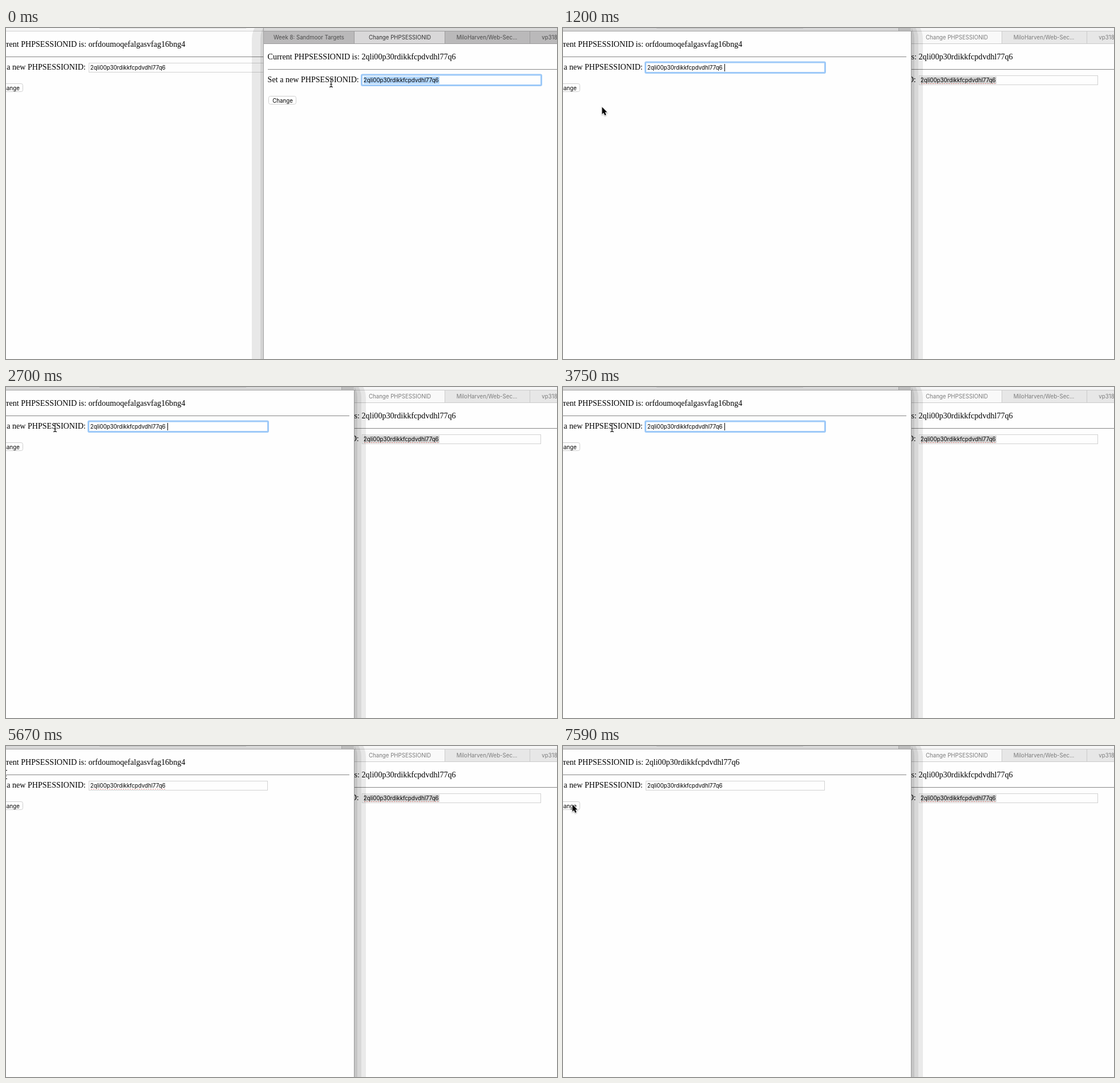
These frames come from a looping animation (966x580 px, 8 s). An HTML page with a canvas:

```html
<!DOCTYPE html>
<html lang="en">
<head>
<meta charset="utf-8">
<title>Session change</title>
<style>
  html, body { margin: 0; width: 100%; height: 100%; overflow: hidden; background: #fefefe; }
  canvas { display: block; }
</style>
</head>
<body>
<canvas id="stage" width="966" height="580"></canvas>
<script>
const W = 966, H = 580, LOOP = 8000;
const SERIF = '14.1px "Liberation Serif", "Times New Roman", serif';
const SANS = '9.7px Inter, Roboto, sans-serif';
const ID_A = 'orfdoumoqefalgasvfag16bng4';
const ID_B = '2qli00p30rdikkfcpdvdhl77q6';
const PAPER = '#fefefe';

const SWITCH = 1200, BLUR = 4340, PRESS = 7440, RELOAD = 7590;

// Pointer moves: start, end, number of held steps, evenly spaced waypoints
const MOVES = [
  [0, 1, 1, [[570, 96]]],
  [750, 1670, 7, [[430, 94], [190, 136], [60, 139], [68, 138], [150, 125], [250, 102], [285, 84]]],
  [1820, 2700, 7, [[280, 83], [245, 71], [86, 71]]],
  [3750, 4780, 8, [[86, 71], [80, 95], [66, 160], [56, 203], [50, 200], [43, 168], [40, 90], [36, 36]]],
  [4930, 5670, 6, [[34, 38], [16, 54], [-1, 50]]],
  [6260, 7300, 8, [[0, 53], [16, 102]]]
];

const ctx = document.getElementById('stage').getContext('2d');

function rect(x, y, w, h, color) {
  ctx.fillStyle = color;
  ctx.fillRect(x, y, w, h);
}

function text(str, x, y, font, color = '#000', align = 'left') {
  ctx.font = font;
  ctx.fillStyle = color;
  ctx.textAlign = align;
  ctx.fillText(str, x, y);
}

function round(x, y, w, h, r, fill, stroke) {
  ctx.beginPath();
  ctx.roundRect(x, y, w, h, r);
  if (fill) { ctx.fillStyle = fill; ctx.fill(); }
  if (stroke) { ctx.strokeStyle = stroke; ctx.lineWidth = 1; ctx.stroke(); }
}

function input(o) {
  if (o.focus) {
    round(622, 80.5, 318, 21.5, 3, '#9dc9f8');
    rect(625, 83.5, 312, 15.5, PAPER);
  } else {
    rect(624, 83, 314, 17, '#d2d2d2');
    rect(625, 84, 312, 15, PAPER);
  }
  if (o.select) rect(627, 85, 133, 13, o.focus ? '#b2d7fe' : '#d5d5d5');
  text(ID_B, 626.8, 95, SANS);
  if (o.spell) {
    for (let x = 628; x < 760; x += 4) rect(x, 97, 2, 1, 'rgba(225,60,50,.55)');
  }
  if (o.caret) rect(762, 85, 1, 13, '#000');
}

// Both windows show the same form at different offsets
function page(dx, dy, o) {
  ctx.save();
  ctx.translate(dx, dy);
  text('Current PHPSESSIONID is: ' + o.id, 458.6, 55, SERIF);
  rect(459, 72, o.rule, 1, '#868686');
  text('Set a new PHPSESSIONID:', 458.6, 95, SERIF);
  input(o);
  round(460.5, 119.5, 48, 14, 3, o.pressed ? '#4a94f5' : '#fff', o.pressed ? '#3b7fe0' : '#cecece');
  text('Change', 485, 130.5, SANS, o.pressed ? '#fff' : '#000', 'center');
  ctx.restore();
}

function shadow(x, w, alpha) {
  round(x, -18, w, H + 60, 36, `rgba(0,0,0,${alpha})`);
}

function leftWindow(t, front) {
  ctx.save();
  ctx.beginPath();
  ctx.rect(0, 0, 611, H);
  ctx.clip();
  rect(0, 0, 611, H, PAPER);
  rect(0, 0, 611, 5, front ? '#d8d8d8' : '#f7f7f7');
  rect(164, 0, 257, 1, front ? '#c2c2c2' : '#dcdcdc');
  if (front) {
    rect(588, 0, 22, 5, '#bdbdbd');
    rect(588, 0, 1, 5, '#a5a5a5');
  }
  rect(0, 5, 611, 1, front ? '#a0a0a0' : '#cfcfcf');
  const focus = front && t < BLUR;
  page(-479, -22, {
    id: t < RELOAD ? ID_A : ID_B,
    rule: 622,
    focus,
    caret: focus,
    spell: t >= BLUR && t < RELOAD,
    pressed: t >= PRESS && t < RELOAD
  });
  if (front) rect(610, 5, 1, H, '#979797');
  ctx.restore();
}

function rightWindow(front) {
  const tabs = [
    [452, 611, 'Week 8: Sandmoor Targets', 531],
    [611, 770, 'Change PHPSESSIONID', 690.5],
    [770, 919, 'MiloHarven/Web-Sec...', 843],
    [919, 1010, 'vp318', 953]
  ];
  const edge = front ? '#9c9b9c' : '#cbcbcb';
  rect(452, 0, W, H, PAPER);
  rect(452, 0, W, 5, front ? '#d8d8d8' : '#f6f6f6');
  tabs.forEach(([x0, x1, label, mid], i) => {
    const open = i === 1;
    rect(x0, 5, x1 - x0, 23, front ? (open ? '#d9d8d9' : '#bab9ba') : (open ? '#f9f9f9' : '#e7e7e7'));
    if (i) rect(x0 - 1, 5, 1, 23, edge);
    const ink = front ? (open ? '#333' : '#4c4c4c') : '#7c7c7c';
    text(label, mid, 20.3, SANS, ink, 'center');
  });
  rect(452, 5, W, 1, edge);
  rect(452, 27, W, 1, edge);
  page(0, 0, { id: ID_B, rule: 520, focus: front, select: true, spell: !front });
  rect(451, 0, 1, H, front ? '#a2a2a2' : '#cbcbcb');
}

function pointerAt(t) {
  const [t0, t1, n, pts] = MOVES.filter(m => m[0] <= t).pop();
  if (n === 1) return pts[0];
  const step = Math.min(n - 1, Math.floor((t - t0) / (t1 - t0) * (n - 1) + 0.08));
  const u = step / (n - 1) * (pts.length - 1);
  const i = Math.min(pts.length - 2, Math.floor(u + 1e-6));
  const f = u - i;
  return [0, 1].map(k => pts[i][k] + (pts[i + 1][k] - pts[i][k]) * f);
}

function ibeam() {
  const stem = new Path2D('M-3 -7.5 Q0 -7.5 0 -5.5 V5.5 Q0 7.5 -3 7.5 M3 -7.5 Q0 -7.5 0 -5.5 M0 5.5 Q0 7.5 3 7.5 M-2 2.5 H2');
  ctx.strokeStyle = 'rgba(255,255,255,.6)';
  ctx.lineWidth = 2.4;
  ctx.stroke(stem);
  ctx.strokeStyle = '#111';
  ctx.lineWidth = 1.1;
  ctx.stroke(stem);
}

function arrow() {
  const body = new Path2D('M.5 .5 V13 L3.3 10.4 L5.3 15 L7.6 14 L5.6 9.6 H9.4 Z');
  ctx.save();
  ctx.shadowColor = 'rgba(0,0,0,.35)';
  ctx.shadowBlur = 2;
  ctx.shadowOffsetY = 1;
  ctx.strokeStyle = '#fff';
  ctx.lineWidth = 1.6;
  ctx.stroke(body);
  ctx.restore();
  ctx.fillStyle = '#000';
  ctx.fill(body);
}

function pointer(t) {
  const [x, y] = pointerAt(t);
  ctx.save();
  ctx.translate(Math.round(x), Math.round(y));
  if (y < 82 || x > 452) ibeam(); else arrow();
  ctx.restore();
}

function draw(t) {
  if (t < SWITCH) {
    leftWindow(t, false);
    shadow(431, 800, 0.085);
    shadow(446, 800, 0.09);
    rightWindow(true);
  } else {
    rightWindow(false);
    shadow(-200, 831, 0.08);
    shadow(-200, 823, 0.08);
    shadow(-200, 816, 0.09);
    leftWindow(t, true);
  }
  pointer(t);
}

function frame(now) {
  draw(now % LOOP);
  requestAnimationFrame(frame);
}
requestAnimationFrame(frame);
</script>
</body>
</html>
```
